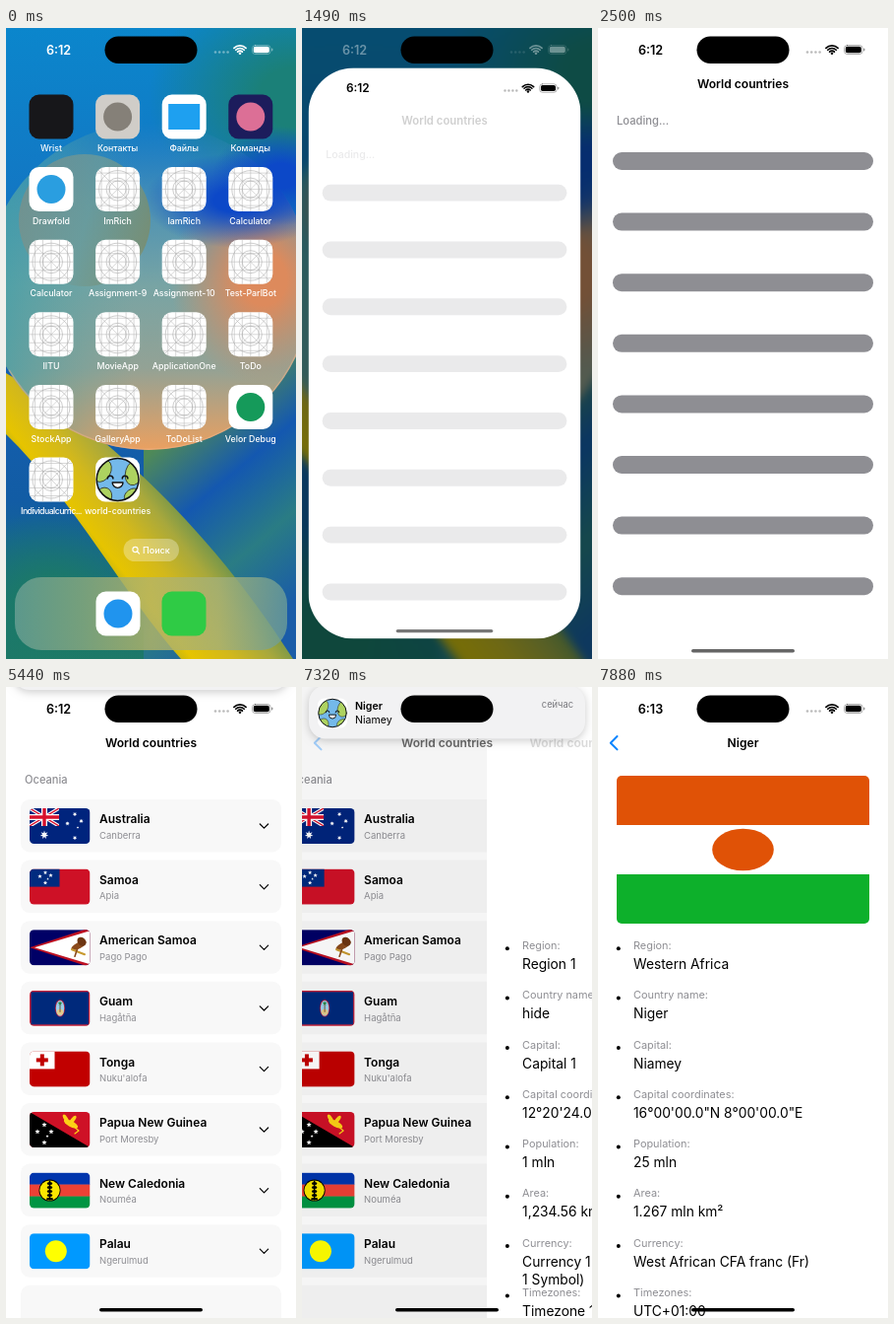
Write an HTML page with a canvas that moves like this. It is 295 by 640 pixels and loops after 7.99 s.

```html
<!DOCTYPE html>
<html lang="en">
<head>
<meta charset="utf-8">
<title>World countries</title>
<style>
html, body { margin: 0; width: 100%; height: 100%; overflow: hidden; background: #fff; }
canvas { display: block; width: 295px; height: 640px; }
</style>
</head>
<body>
<canvas id="stage"></canvas>
<script>
const W = 295, H = 640, LOOP = 7990, TAU = Math.PI * 2;
const GRAY = '#8e8e93', PITCH = 61.6;
const canvas = document.getElementById('stage');
const ctx = canvas.getContext('2d');
const ratio = window.devicePixelRatio || 1;
canvas.width = W * ratio;
canvas.height = H * ratio;

const clamp = (v, lo = 0, hi = 1) => Math.min(hi, Math.max(lo, v));
const mix = (a, b, p) => a + (b - a) * p;

// ---------- drawing helpers ----------
function layer(draw) { ctx.save(); draw(); ctx.restore(); }
function rect(x, y, w, h, color) { ctx.fillStyle = color; ctx.fillRect(x, y, w, h); }
function roundPath(x, y, w, h, r) { ctx.beginPath(); ctx.roundRect(x, y, w, h, r); }
function round(x, y, w, h, r, color) { roundPath(x, y, w, h, r); ctx.fillStyle = color; ctx.fill(); }
function oval(x, y, rx, ry, color, tilt = 0) {
  ctx.beginPath(); ctx.ellipse(x, y, rx, ry, tilt, 0, TAU); ctx.fillStyle = color; ctx.fill();
}
function disc(x, y, r, color) { oval(x, y, r, r, color); }
function poly(points, color) {
  ctx.beginPath(); points.forEach(p => ctx.lineTo(...p)); ctx.closePath();
  ctx.fillStyle = color; ctx.fill();
}
function line(points, color, width, cap = 'butt') {
  ctx.beginPath(); points.forEach(p => ctx.lineTo(...p));
  ctx.strokeStyle = color; ctx.lineWidth = width; ctx.lineCap = cap; ctx.lineJoin = 'round'; ctx.stroke();
}
function arc(x, y, r, from, to, color, width) {
  ctx.beginPath(); ctx.arc(x, y, r, from, to);
  ctx.strokeStyle = color; ctx.lineWidth = width; ctx.stroke();
}
function star(x, y, r, tips = 5, color = '#fff') {
  const points = [];
  for (let i = 0; i < tips * 2; i++) {
    const a = i * Math.PI / tips - Math.PI / 2, d = i % 2 ? r * 0.45 : r;
    points.push([x + d * Math.cos(a), y + d * Math.sin(a)]);
  }
  poly(points, color);
}
function text(s, x, y, size, weight = 400, color = '#000', align = 'left') {
  ctx.font = `${weight} ${size}px Inter, "Noto Sans", sans-serif`;
  ctx.textAlign = align;
  ctx.fillStyle = color;
  ctx.fillText(s, x, y + size * 0.36);
}
function gradient(x0, y0, x1, y1, ...colors) {
  const g = ctx.createLinearGradient(x0, y0, x1, y1);
  colors.forEach((c, i) => g.addColorStop(i / (colors.length - 1), c));
  return g;
}
function glow(x, y, rx, ry, color) {
  layer(() => {
    ctx.translate(x, y); ctx.scale(rx, ry);
    const g = ctx.createRadialGradient(0, 0, 0.25, 0, 0, 1);
    g.addColorStop(0, color);
    g.addColorStop(1, color + '00');
    disc(0, 0, 1, g);
  });
}

// ---------- system chrome ----------
function statusBar(time, color, dots) {
  text(time, 53.5, 22, 12.6, 600, color, 'center');
  for (let i = 0; i < 4; i++) disc(213 + i * 4.2, 24.5, 1.3, dots);
  for (const r of [3.4, 6, 8.6]) arc(238, 26.5, r, Math.PI * 1.25, Math.PI * 1.75, color, 1.7);
  disc(238, 25.7, 1.3, color);
  roundPath(250.5, 17.5, 18.5, 9, 3);
  ctx.strokeStyle = color; ctx.globalAlpha *= 0.4; ctx.lineWidth = 0.8; ctx.stroke();
  round(270, 20.5, 1.4, 3, 0.7, color);
  ctx.globalAlpha /= 0.4;
  round(251.8, 18.8, 16, 6.4, 1.9, color);
}
const island = () => round(100.5, 8.5, 94, 27.5, 13.75, '#000');
const homeBar = color => round(95, 630, 105, 3.6, 1.8, color);
const navTitle = (s, x = 147.5, color = '#000') => text(s, x, 57, 12.1, 600, color, 'center');

// ---------- home screen ----------
function wallpaper() {
  rect(0, 0, W, H, gradient(0, 0, 0, H, '#0b86cc', '#1278c4', '#1560b4', '#125ca4', '#1d7868'));
  glow(295, 70, 150, 120, '#1b8078');

  // Field below the sphere: blue and teal to the right, green at the lower left.
  rect(140, 330, 155, 310, gradient(160, 420, 295, 580, '#4f8a58', '#1458b0', '#2a7c84', '#1a5ca8'));
  glow(45, 590, 110, 100, '#1c7a66');

  ctx.beginPath();
  ctx.moveTo(0, 350);
  ctx.bezierCurveTo(70, 390, 190, 480, 292, 640);
  ctx.lineTo(178, 640);
  ctx.bezierCurveTo(120, 575, 70, 480, 0, 412);
  ctx.fillStyle = gradient(85, 560, 185, 480, '#8a9a30', '#e6c400', '#d2b81c', '#a8a83c', '#5f8e50');
  ctx.fill();

  layer(() => {
    ctx.beginPath(); ctx.arc(145, 262, 166, 0, TAU); ctx.clip();
    rect(0, 90, W, 340, gradient(0, 96, 0, 428, '#3a86c000', '#4c92b4', '#78a4a4', '#93a295', '#eaa060'));
    rect(0, 90, W, 340, gradient(0, 0, 130, 0, '#3f9fa8b0', '#5aa2a000'));
    glow(262, 255, 95, 105, '#dd8a5c');
    glow(235, 175, 95, 48, '#0c48c8');
  });
  glow(280, 150, 70, 50, '#0c48c8');
  disc(80, 195, 67, gradient(15, 180, 147, 215, '#7d9088c0', '#6f9c98c0', '#7c8c68d0'));
  arc(145, 262, 165.3, 0.42, 2.6, '#f2b48a80', 1.4);
}

function tile(x, y, fill, size = 45) {
  round(x - size / 2, y - size / 2, size, size, size * 0.225, fill);
}
function gridIcon(x, y) {
  tile(x, y, '#fff');
  layer(() => {
    roundPath(x - 22.5, y - 22.5, 45, 45, 10); ctx.clip();
    for (const d of [-16.5, -8.5, 0, 8.5, 16.5]) {
      line([[x + d, y - 23], [x + d, y + 23]], '#bdbdbd', 0.6);
      line([[x - 23, y + d], [x + 23, y + d]], '#bdbdbd', 0.6);
    }
    for (const s of [-1, 1]) line([[x - 23, y - 23 * s], [x + 23, y + 23 * s]], '#bdbdbd', 0.6);
    for (const r of [8.5, 11.5, 19]) arc(x, y, r, 0, TAU, '#ababab', 0.6);
  });
}
function globeIcon(x, y, size = 45) {
  layer(() => {
    ctx.translate(x, y); ctx.scale(size / 45, size / 45);
    tile(0, 0, '#fff');
    disc(0, 0, 21.4, '#74b9ea');
    layer(() => {
      ctx.beginPath(); ctx.arc(0, 0, 21.4, 0, TAU); ctx.clip();
      const land = [[-16, -9, 9, 12, 0.5], [17, -7, 9, 13, 0.3], [-14, 17, 8, 9, 0.4], [14, 15, 8, 5, -0.6]];
      for (const [lx, ly, rx, ry, tilt] of land) {
        oval(lx, ly, rx, ry, '#add260', tilt);
        ctx.strokeStyle = '#222'; ctx.lineWidth = 0.8; ctx.stroke();
      }
    });
    arc(0, 0, 21.4, 0, TAU, '#111', 1.5);
    for (const s of [-1, 1]) arc(s * 7.5, -1, 2.8, Math.PI, TAU, '#111', 1.5);
    ctx.beginPath(); ctx.arc(0, 3, 5.4, 0, Math.PI); ctx.closePath();
    ctx.fillStyle = '#fff'; ctx.fill();
    ctx.strokeStyle = '#111'; ctx.lineWidth = 1.4; ctx.stroke();
  });
}
const badge = (back, color) => (x, y) => { tile(x, y, back); if (color) disc(x, y, 14.5, color); };
const APPS = [
  ['Wrist', badge('#17171a')], ['Контакты', badge('#d0cdc8', '#858078')],
  ['Файлы', (x, y) => { tile(x, y, '#fff'); rect(x - 16, y - 13, 32, 26, '#1ea0f0'); }],
  ['Команды', badge('#1c1c5c', '#dc6f96')],
  ['Drawfold', badge('#fff', '#2a9ee0')], ['ImRich'], ['IamRich'], ['Calculator'],
  ['Calculator'], ['Assignment-9'], ['Assignment-10'], ['Test-ParlBot'],
  ['IITU'], ['MovieApp'], ['ApplicationOne'], ['ToDo'],
  ['StockApp'], ['GalleryApp'], ['ToDoList'], ['Velor Debug', badge('#fff', '#159a5a')],
  ['Individualcurric...'], ['world-countries', globeIcon]
];

function homeIcons(hideApp) {
  APPS.forEach(([name, icon = gridIcon], i) => {
    const x = 46 + (i % 4) * 67.6, y = 90 + Math.floor(i / 4) * 73.6;
    if (!(hideApp && icon === globeIcon)) icon(x, y);
    ctx.letterSpacing = name.length > 16 ? '-0.6px' : '0px';
    text(name, x, y + 32, 8.8, 500, '#fff', 'center');
    ctx.letterSpacing = '0px';
  });
  round(119.5, 518, 56.5, 23, 11.5, 'rgba(255,255,255,.3)');
  arc(131.5, 529, 2.6, 0, TAU, '#fff', 1.1);
  line([[133.4, 531], [135.6, 533.2]], '#fff', 1.2, 'round');
  text('Поиск', 139, 529.5, 9, 500, '#fff');
  round(9, 557, 277, 74, 27, gradient(9, 0, 286, 0, '#6a9f94d0', '#8aa880d0', '#b4b468d0', '#a4b078d0', '#6a9c98d0'));
  badge('#fff', '#2094ee')(114, 594);
  tile(181, 594, '#2fcb45');
}
function home() {
  wallpaper();
  homeIcons(false);
  statusBar('6:12', '#fff', 'rgba(255,255,255,.4)');
  island();
}

// ---------- loading screen ----------
function loadingBody(barAlpha) {
  navTitle('World countries');
  text('Loading...', 19, 94, 11.2, 500, GRAY);
  layer(() => {
    ctx.globalAlpha *= barAlpha;
    for (let i = 0; i < 8; i++) round(15, 126 + i * PITCH, 265, 18, 9, GRAY);
  });
}
function loading(barAlpha) {
  rect(0, 0, W, H, '#fff');
  statusBar('6:12', '#000', '#bbb');
  loadingBody(barAlpha);
  island();
  homeBar('#666');
}

function opening(k) {
  if (k === 0) {
    home();
    globeIcon(114, 454, 52);
    return;
  }
  if (k > 5) return loading(0.85);
  const px = 1 - Math.exp(-1.3 * k), py = 1 - Math.exp(-1.18 * k);
  const x = 88 * (1 - px), w = mix(140, W, px) - x;
  const y = 428 * (1 - py), h = mix(422, H, py) - y;
  layer(() => {
    ctx.filter = `blur(${5 * px * ratio}px)`;
    ctx.translate(W / 2, H / 2); ctx.scale(1 + 0.1 * px, 1 + 0.1 * px); ctx.translate(-W / 2, -H / 2);
    const flat = new OffscreenCanvas(1, 1) && backdrop();
    ctx.drawImage(flat, 0, 0, W, H);
  });
  if (k === 1) layer(() => { ctx.globalAlpha = 0.5; homeIcons(true); });
  rect(0, 0, W, H, `rgba(0,18,16,${0.52 * px})`);
  layer(() => { ctx.globalAlpha = 0.4; statusBar('6:12', '#fff', 'rgba(255,255,255,.3)'); });
  layer(() => {
    roundPath(x, y, w, h, Math.min(w / 4, 46)); ctx.clip();
    rect(x, y, w, h, '#fff');
    if (k === 1) layer(() => { ctx.globalAlpha = 0.6; globeIcon(x + w / 2, y + h / 2, w); });
    const scale = w / W;
    layer(() => {
      ctx.translate(x, y); ctx.scale(scale, scale);
      statusBar('6:12', '#000', '#bbb');
      ctx.globalAlpha = clamp((k - 1.4) / 3.2);
      loadingBody(1);
    });
    round(x + 95 * scale, y + h - 9.5, 105 * scale, 3.4, 1.7, '#777');
  });
  island();
}

// A still copy of the wallpaper, so that it can be blurred as one picture.
let still;
function backdrop() {
  if (still) return still;
  still = document.createElement('canvas');
  still.width = canvas.width;
  still.height = canvas.height;
  layer(() => {
    ctx.setTransform(ratio, 0, 0, ratio, 0, 0);
    ctx.filter = 'none';
    wallpaper();
  });
  still.getContext('2d').drawImage(canvas, 0, 0);
  return still;
}

// ---------- country list; flags use a 61 x 36 box ----------
function unionJack() {
  layer(() => {
    ctx.beginPath(); ctx.rect(0, 0, 30, 18); ctx.clip();
    for (const [color, width] of [['#fff', 3.6], ['#d8102c', 1.4]]) {
      line([[0, 0], [30, 18]], color, width);
      line([[30, 0], [0, 18]], color, width);
    }
    for (const [color, width] of [['#fff', 6], ['#d8102c', 3.4]]) {
      line([[15, 0], [15, 18]], color, width);
      line([[0, 9], [30, 9]], color, width);
    }
  });
}
function bands(...colors) {
  colors.forEach((c, i) => rect(0, i * 36 / colors.length, 61.5, 36 / colors.length + 0.3, c));
}
const COUNTRIES = [
  ['Australia', 'Canberra', () => {
    bands('#00247d'); unionJack();
    star(15, 27, 4.4, 7);
    [[46, 6], [38.5, 15.5], [52.5, 13], [46, 30]].forEach(([x, y]) => star(x, y, 2.3, 7));
    star(49, 19.5, 1.3);
  }],
  ['Samoa', 'Apia', () => {
    bands('#ce1126'); rect(0, 0, 30.5, 18, '#002b7f');
    [[16, 3.6], [10.5, 7.5], [21.5, 6.5], [16, 14]].forEach(([x, y]) => star(x, y, 2.2));
    star(18.5, 10, 1.3);
  }],
  ['American Samoa', 'Pago Pago', () => {
    bands('#000066');
    poly([[0, 18], [61.5, -2], [61.5, 38]], '#bd1021');
    poly([[5, 18], [61.5, 1], [61.5, 35]], '#fff');
    oval(50, 16, 8.5, 3.2, '#8a4a1c', -0.5);
    oval(53, 12, 5, 4, '#6d3512', 0.8);
    line([[43, 20], [56, 25]], '#c89a30', 2, 'round');
    line([[49, 18], [46, 27]], '#8a4a1c', 1.6, 'round');
  }],
  ['Guam', 'Hagåtña', () => {
    bands('#c62139'); rect(1.5, 1.5, 58.5, 33, '#00297b');
    oval(31, 18, 5, 8.8, '#c62139');
    oval(31, 18, 4.2, 7.9, '#9cd0ec');
    oval(31, 22, 3.4, 3, '#e4cc8a');
    line([[31, 12], [31, 22]], '#6a4a28', 0.9);
    star(31, 13, 2.4, 5, '#2b8a4a');
  }],
  ['Tonga', "Nuku'alofa", () => {
    bands('#c10000'); rect(0, 0, 25.5, 18, '#fff');
    rect(10.8, 3, 4, 12, '#c10000'); rect(6.8, 7, 12, 4, '#c10000');
  }],
  ['Papua New Guinea', 'Port Moresby', () => {
    bands('#ce1126'); poly([[0, 0], [61.5, 36], [0, 36]], '#000');
    [[15, 13], [8, 20], [22, 20], [15, 31]].forEach(([x, y]) => star(x, y, 2.7));
    star(18, 24.5, 1.6);
    oval(42, 12, 8, 3, '#fcd116', 0.5);
    oval(37, 7, 5, 2, '#fcd116', 1);
    oval(44, 8, 5, 2, '#fcd116', -0.9);
    line([[44, 14], [50, 19], [46, 22]], '#fcd116', 1.2, 'round');
  }],
  ['New Caledonia', 'Nouméa', () => {
    bands('#0035ad', '#ed4135', '#009543');
    disc(20.5, 18, 11, '#000'); disc(20.5, 18, 10.2, '#fae600');
    line([[20.5, 8], [20.5, 28]], '#000', 1.5);
    [11, 15, 19, 23].forEach(y => oval(20.5, y, 2.8, 1.5, '#000'));
    oval(20.5, 26.5, 3.6, 1.2, '#000');
  }],
  ['Palau', 'Ngerulmud', () => { bands('#0099ff'); disc(26.8, 18, 11, '#ffff00'); }]
];

function countryList() {
  rect(0, 0, W, H, '#fff');
  text('Oceania', 19, 94, 11.1, 500, GRAY);
  for (let i = 0; i < 9; i++) round(15, 114 + i * PITCH, 265, 53.5, 9, '#f8f8f8');
  COUNTRIES.forEach(([name, capital, flag], i) => {
    const y = 141 + i * PITCH;
    layer(() => {
      ctx.translate(24, y - 18);
      roundPath(0, 0, 61.5, 36, 4.5); ctx.clip();
      flag();
    });
    text(name, 95, y - 7.2, 12, 600);
    text(capital, 95, y + 9.3, 9.5, 400, GRAY);
    line([[258.3, y - 2], [262.5, y + 2.2], [266.7, y - 2]], '#000', 1.2, 'round');
  });
}

function banner(top) {
  layer(() => {
    ctx.shadowColor = 'rgba(0,0,0,.2)'; ctx.shadowBlur = 9 * ratio; ctx.shadowOffsetY = 2 * ratio;
    round(7, top, 281, 54, 17, '#f2f2f3');
  });
  globeIcon(31, top + 28, 30);
  text('Niger', 54, top + 20.5, 10.6, 600);
  text('Niamey', 54, top + 34.5, 10.6);
  text('сейчас', 276, top + 19.5, 9.3, 400, '#77777c', 'right');
}
function listWithBanner(k) {
  countryList();
  navTitle('World countries');
  statusBar('6:12', '#000', '#bbb');
  banner(44 - 95 * Math.exp(-k));
  island();
  homeBar('#000');
}

// ---------- detail page ----------
const LABELS = ['Region', 'Country name', 'Capital', 'Capital coordinates', 'Population', 'Area', 'Currency', 'Timezones'];
const EMPTY = ['Region 1', 'hide', 'Capital 1', '12°20\'24.0"N 12°20\'24.0"E', '1 mln', '1,234.56 km²',
  'Currency 1 (Currency\n1 Symbol)', 'Timezone 1'];
const NIGER = ['Western Africa', 'Niger', 'Niamey', '16°00\'00.0"N 8°00\'00.0"E', '25 mln', '1.267 mln km²',
  'West African CFA franc (Fr)', 'UTC+01:00'];

function nigerFlag() {
  layer(() => {
    roundPath(19, 90, 257, 150, 5); ctx.clip();
    rect(19, 90, 257, 50, '#e05206');
    rect(19, 190, 257, 50, '#0db02b');
    oval(147.5, 165, 31.3, 21.3, '#e05206');
  });
}
function detail(loaded) {
  rect(0, 0, W, H, '#fff');
  if (loaded) nigerFlag();
  const values = loaded ? NIGER : EMPTY;
  LABELS.forEach((label, i) => {
    const y = 262 + i * 50.3;
    disc(20.8, y + 3.3, 2, '#000');
    text(label + ':', 36, y, 10.9, 400, GRAY);
    values[i].split('\n').forEach((s, n) => text(s, 36, y + 19 + n * 18, 13.8));
  });
}
function pushing(k) {
  const w = 1.27 * k;
  const p = k > 5 ? 1 : 1 - (1 + w) * Math.exp(-w);
  const loaded = k > 4;
  layer(() => { ctx.translate(-88 * p, 0); countryList(); });
  rect(0, 0, W, H, `rgba(0,0,0,${0.11 * p})`);
  layer(() => { ctx.translate(W * (1 - p), 0); detail(loaded); });
  navTitle('World countries', 147.5, `rgba(0,0,0,${clamp(1 - p * 1.15)})`);
  navTitle(loaded ? 'Niger' : 'World countries', 147.5 + 205 * (1 - p), `rgba(0,0,0,${clamp(p * 1.5 - 0.4)})`);
  line([[19.5, 50], [12.8, 56.7], [19.5, 63.4]], `rgba(10,132,255,${clamp(p)})`, 2, 'round');
  statusBar(k < 2 ? '6:12' : '6:13', '#000', '#bbb');
  if (k < 2) banner(44 - 45.5 * k);
  island();
  homeBar('#000');
}

// ---------- timeline ----------
// Index of the held step within a stretch of evenly spaced steps.
const step = (t, start, end, count) =>
  Math.min(count - 1, Math.floor((t - start + 5) / ((end - start) / (count - 1))));

function render(t) {
  ctx.setTransform(ratio, 0, 0, ratio, 0, 0);
  if (t < 1270) home();
  else if (t < 2150) opening(step(t, 1270, 2050, 8));
  else if (t < 5440) loading(0.88 + 0.04 * step(t, 2150, 2500, 4));
  else if (t < 7210) listWithBanner(step(t, 5440, 6130, 7));
  else pushing(step(t, 7210, 7880, 7));
}
const origin = performance.now();
function tick() {
  render((performance.now() - origin) % LOOP);
  requestAnimationFrame(tick);
}
tick();
</script>
</body>
</html>
```
